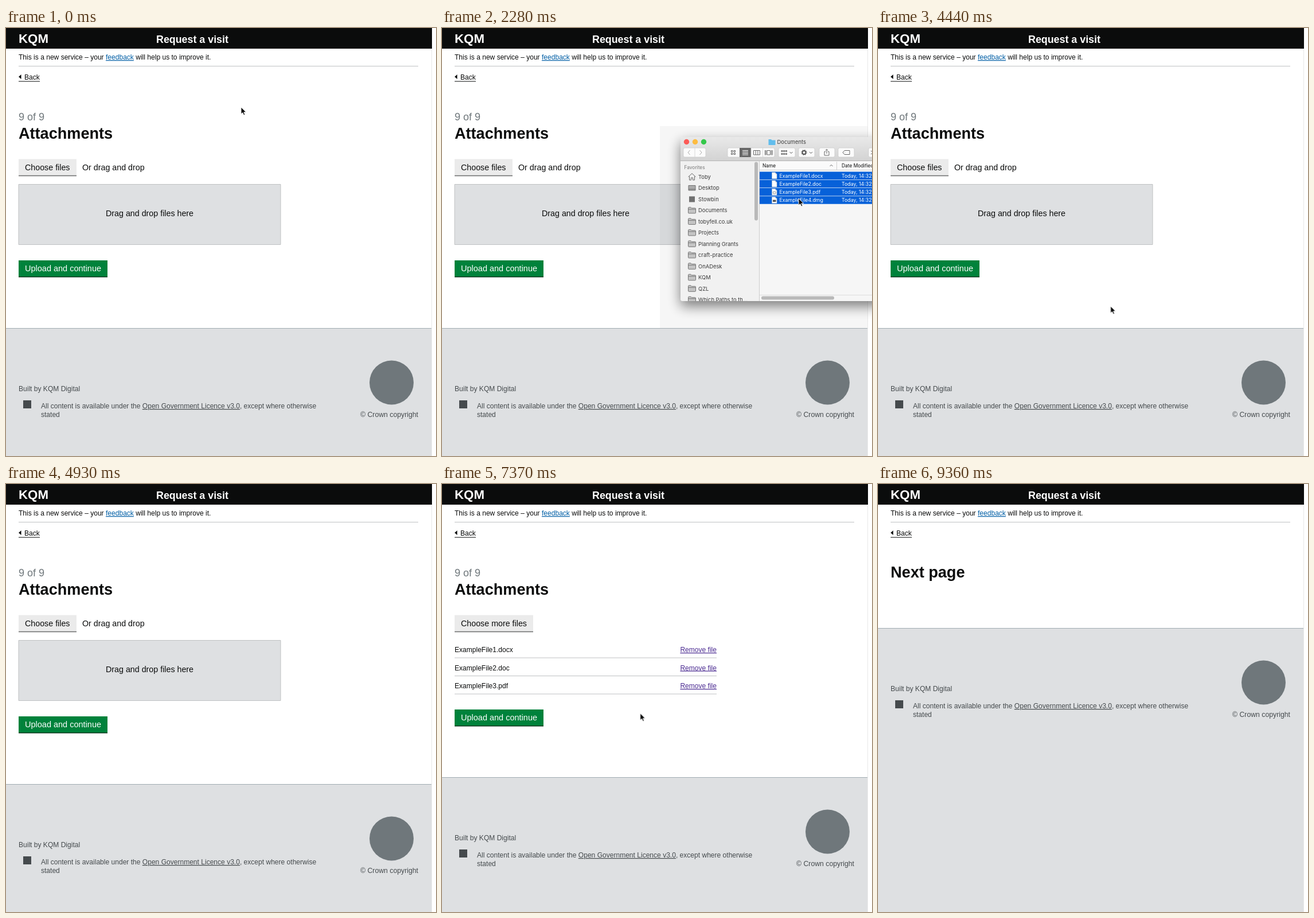
An HTML page that plays this animation: 750x746 px, repeating every 9840 ms.

```html
<!DOCTYPE html>
<html lang="en">
<head>
<meta charset="utf-8">
<title>Attachments</title>
<style>
html, body { margin: 0; width: 100%; height: 100%; overflow: hidden; background: #fff; }
svg { display: block; width: 750px; height: 746px; font: 12.05px "Liberation Sans", Arial, sans-serif; fill: #0b0c0c; }
.bold { font-weight: bold; }
.mid { font-size: 14.27px; }
.title { font-size: 27.1px; font-weight: bold; }
.grey { fill: #6f777b; }
.foot { fill: #454a4d; }
.under { text-decoration: underline; }
.link { fill: #005ea5; text-decoration: underline; }
.remove { fill: #4c2c92; text-decoration: underline; text-anchor: end; }
.rule { stroke: #bfc1c3; }
.ui { font: 9.4px Inter, Roboto, sans-serif; fill: #3a3a3a; }
.list { font: 8.8px Inter, Roboto, sans-serif; fill: #222; }
.small { font: 8.4px Inter, Roboto, sans-serif; }
.icon { fill: none; stroke: #666; stroke-width: 1; }
.window { filter: drop-shadow(0 9px 11px rgba(0, 0, 0, .5)); }

/* One 9840 ms loop: 1% is 98.4 ms */
.anim { animation: 9.84s step-end infinite; }
#form { animation-name: form; }
#heading { animation-name: heading; }
#files { animation-name: files; }
#lastFile { animation-name: lastFile; }
#linkFocus { animation-name: linkFocus; }
#next { animation-name: next; }
#footer { animation-name: footer; }
#submit { animation-name: submit; }
#submitFill { animation-name: hover; }
#submitFocus { animation-name: submitFocus; }
#finder { animation-name: finder; }
#selectFirst { animation-name: selectFirst; }
#selectRest { animation-name: selectRest; }
#actions { animation-name: actions; }
#stripes { animation-name: stripes; }
#ghost { animation-name: ghost; }
#arrow { animation-name: arrow; }
#hand { animation-name: hand; }
#pointer { animation-name: pointer; }

@keyframes form { 0% { opacity: 1 } 55.87%, 100% { opacity: 0 } }
@keyframes heading { 0% { opacity: 1 } 85.55%, 100% { opacity: 0 } }
@keyframes files { 0%, 85.55%, 100% { opacity: 0 } 55.87% { opacity: 1 } }
@keyframes lastFile { 0% { opacity: 1 } 60.65%, 100% { opacity: 0 } }
@keyframes linkFocus { 0% { opacity: 0 } 58.92%, 100% { opacity: 1 } }
@keyframes next { 0% { opacity: 0 } 85.55%, 100% { opacity: 1 } }
@keyframes footer {
  0% { transform: translateY(523px) }
  55.87% { transform: translateY(543px) }
  60.65% { transform: translateY(511px) }
  85.55%, 100% { transform: translateY(251px) }
}
@keyframes submit {
  0% { transform: translate(22px, 405px); opacity: 1 }
  55.87% { transform: translate(22px, 424px); opacity: 1 }
  60.65% { transform: translate(22px, 393px); opacity: 1 }
  85.55%, 100% { transform: translate(22px, 393px); opacity: 0 }
}
@keyframes hover { 0% { fill: #00823b } 77.22%, 100% { fill: #00692f } }
@keyframes submitFocus { 0% { opacity: 0 } 83.11%, 100% { opacity: 1 } }
@keyframes finder { 0%, 43.27%, 100% { opacity: 0 } 7.5% { opacity: 1 } }
@keyframes selectFirst { 0% { opacity: 0 } 17.866%, 100% { opacity: 1 } }
@keyframes selectRest { 0% { opacity: 0 } 23.15%, 100% { opacity: 1 } }
@keyframes actions { 0% { opacity: .4 } 17.866%, 100% { opacity: 1 } }
@keyframes stripes { 0% { opacity: 0 } 35.04%, 100% { opacity: 1 } }
@keyframes ghost { 0%, 42.05%, 100% { opacity: 0 } 35.04% { opacity: 1 } }
@keyframes arrow { 0%, 66.75%, 89.82%, 100% { opacity: 1 } 55.87%, 77.22% { opacity: 0 } }
@keyframes hand { 0%, 66.75%, 89.82%, 100% { opacity: 0 } 55.87%, 77.22% { opacity: 1 } }
@keyframes pointer {
  0% { transform: translate(410px, 138px) }
  .589% { transform: translate(412px, 140px) }
  2.114% { transform: translate(412px, 140px); animation-timing-function: steps(3, start) }
  3.791% { transform: translate(712px, 191px) }
  7.5% { transform: translate(682px, 227px) }
  11.768% { transform: translate(682px, 227px); animation-timing-function: steps(3, start) }
  13.598% { transform: translate(622px, 254px) }
  17.866% { transform: translate(622px, 254px); animation-timing-function: steps(6, start) }
  21.28% { transform: translate(622px, 297px) }
  23.76% { transform: translate(622px, 297px); animation-timing-function: steps(6, start) }
  27.175% { transform: translate(622px, 254px) }
  28.435% { transform: translate(622px, 254px); animation-timing-function: steps(3, start) }
  30.11% { transform: translate(626px, 250px) }
  35.04% { transform: translate(626px, 250px); animation-timing-function: steps(5, start) }
  38.72% { transform: translate(318px, 331px); animation-timing-function: steps(4, start) }
  41.36% { transform: translate(298px, 338px) }
  43.27% { transform: translate(298px, 338px); animation-timing-function: steps(3, start) }
  45.1% { transform: translate(380px, 447px); animation-timing-function: steps(8, start) }
  50.79% { transform: translate(585px, 750px) }
  55.87% { transform: translate(443px, 385px) }
  66.75% { transform: translate(443px, 385px); animation-timing-function: steps(4, start) }
  69.46% { transform: translate(440px, 395px) }
  73.66% { transform: translate(440px, 395px); animation-timing-function: steps(9, start) }
  78.91% { transform: translate(157px, 409px) }
  89.82% { transform: translate(157px, 409px); animation-timing-function: steps(9, start) }
  95.77%, 100% { transform: translate(709px, 750px) }
}
</style>
</head>
<body>
<svg viewBox="0 0 750 746">
  <defs>
    <clipPath id="frame"><path d="M416 195q0-5 5-5H800V476H420q-4 0-4-4z"/></clipPath>
    <linearGradient id="bar" x2="0" y2="1"><stop stop-color="#e9e9e9"/><stop offset="1" stop-color="#d3d3d3"/></linearGradient>
    <path id="folder" d="M0 2.5Q0 1 1 1H4.5L6 2.5H12Q13 2.5 13 3.5V10.5Q13 11.5 12 11.5H1Q0 11.5 0 10.5zM0 4.5H13" fill="#c4c4c4" stroke="#757575"/>
    <g id="doc"><path d="M0 0H5.5L8.5 3V11H0z" fill="#fff" stroke="#bbb" stroke-width=".5"/><path d="M5.5 0V3H8.5z" fill="#d8d8d8"/></g>
  </defs>

  <path d="M742.5 0V746" stroke="#e8e8e8"/>
  <path d="M0 0H743V36H0z"/>
  <g class="bold" fill="#fff">
    <text x="22" y="25.5" font-size="22.3">KQM</text>
    <text x="262" y="25.5" font-size="17.85">Request a visit</text>
  </g>
  <text x="22" y="55">This is a new service – your <tspan class="link">feedback</tspan> will help us to improve it.</text>
  <path class="rule" d="M22 66.5H719"/>
  <path d="M22 85L26.5 81V89zM22 92.5H59V93.5H22z"/>
  <text x="32" y="90">Back</text>

  <g id="heading" class="anim">
    <text class="grey" x="22" y="161" font-size="18">9 of 9</text>
    <text class="title" x="22" y="193">Attachments</text>
  </g>

  <g id="form" class="anim mid">
    <path d="M22 228.5H123V257H22z" fill="#ebebeb"/>
    <path d="M22 257.5H123" stroke="#6b6d6d" stroke-width="1.5"/>
    <text x="33" y="248">Choose files</text>
    <text x="133" y="248">Or drag and drop</text>
    <path class="rule" d="M22 272.5H479V377.5H22z" fill="#dee0e2"/>
    <text x="174" y="328">Drag and drop files here</text>
  </g>

  <g id="files" class="anim">
    <path d="M22 228.5H159V257H22z" fill="#ebebeb"/>
    <path d="M22 257.5H159" stroke="#6b6d6d" stroke-width="1.5"/>
    <text class="mid" x="33" y="248">Choose more files</text>
    <g id="fileRows"></g>
    <g id="lastFile" class="anim">
      <g id="lastRow"></g>
      <path id="linkFocus" class="anim" d="M414 375H480V391H414z" fill="none" stroke="#ffbf47" stroke-width="2"/>
    </g>
  </g>

  <g id="next" class="anim"><text class="title" x="22" y="163">Next page</text></g>

  <g id="submit" class="anim">
    <path id="submitFill" class="anim" d="M0 0H155V29H0z"/>
    <path d="M0 28H155V29.5H0z" fill="#003618"/>
    <path id="submitFocus" class="anim" d="M-1-1H156V29.500H-1z" fill="none" stroke="#ffbf47" stroke-width="2"/>
    <text x="11" y="19" font-size="14.5" fill="#fff">Upload and continue</text>
  </g>

  <g id="footer" class="anim">
    <path d="M0 0H742V520H0z" fill="#dee0e2"/>
    <path d="M0 .5H742" stroke="#a1acb2"/>
    <g class="foot">
      <text x="22" y="110">Built by KQM Digital</text>
      <rect x="30" y="126" width="14" height="14"/>
      <text x="61" y="140">All content is available under the <tspan class="under">Open Government Licence v3.0</tspan>, except where otherwise</text>
      <text x="61" y="155">stated</text>
      <text x="719" y="155" text-anchor="end" font-size="12.25">© Crown copyright</text>
    </g>
    <circle class="grey" cx="672.5" cy="95" r="38.5"/>
  </g>

  <g id="finder" class="anim">
    <path d="M380 171H742V523H380z" fill-opacity=".035"/>
    <path class="window" d="M416 195q0-5 5-5H800V476H420q-4 0-4-4z" fill="#f6f6f6"/>
    <g clip-path="url(#frame)">
      <path d="M416 190H800V231H416z" fill="url(#bar)"/>
      <path d="M416 231.5H800" stroke="#b5b5b5"/>
      <circle cx="426.5" cy="198.5" r="4.7" fill="#fc5b57"/>
      <circle cx="441.5" cy="198.5" r="4.7" fill="#fdbc40"/>
      <circle cx="456.5" cy="198.5" r="4.7" fill="#34c84a"/>
      <path d="M569.5 194H574L575.5 195.5H581.5V204H569.5z" fill="#62bdec"/>
      <text class="ui" x="584.5" y="202">Documents</text>
      <g id="tools" fill="#fbfbfb" stroke="#c3c3c3" stroke-width=".6"></g>
      <path d="M519 209H539V225H519z" fill="#666"/>
      <path d="M539 209V225M559.5 209V225M441 209V225" stroke="#ccc" stroke-width=".7"/>
      <g class="icon">
        <path d="M432.5 213L429 217L432.5 221M449.5 213L453 217L449.5 221" stroke="#aaa"/>
        <path d="M504.5 213.5h2.5v2.5h-2.5zm4.5 0h2.5v2.5H509zm-4.5 4.5h2.5v2.5h-2.5zm4.5 0h2.5v2.5H509z"/>
        <path d="M524 213.5H534M524 216H534M524 218.5H534M524 221H534" stroke="#fff"/>
        <path d="M543.5 213.5H554.5V221H543.5zM547.2 213.5V221M550.9 213.5V221M567 213.5H572.5V221H567zM563.5 213V221.5M565.2 213V221.5M574.5 213V221.5M576.3 213V221.5"/>
        <path d="M592 213.5h2v2h-2zm3.7 0h2v2h-2zm3.7 0h2v2h-2zM592 218.5h2v2h-2zm3.7 0h2v2h-2zm3.7 0h2v2h-2zM606.5 216L609 218.5L611.5 216M641 216L643.5 218.5L646 216" stroke="#555"/>
        <circle cx="631.5" cy="217" r="3" stroke="#555" stroke-width="2"/>
        <circle cx="631.5" cy="217" r="4.6" stroke="#555" stroke-dasharray="1.8 1.81"/>
        <g id="actions" class="anim">
          <path d="M669 215.5H667V222H675V215.5H673M671 219V211.5M668.8 213.5L671 211.3L673.2 213.5"/>
          <path d="M699 217L702 213.5H711V220.5H702zM702.5 217h.6"/>
        </g>
        <path d="M748 214L752 217L748 220"/>
      </g>

      <path d="M416 232H553V476H416z" fill="#f1f1f1"/>
      <text class="small" x="422.5" y="246" fill="#777" font-weight="500">Favorites</text>
      <g id="sidebar" class="ui"></g>
      <rect x="545" y="233.5" width="6" height="102" rx="3" fill="#b9b9b9"/>
      <path d="M553.5 232V476" stroke="#ccc"/>

      <path d="M554 232H800V247H554z" fill="#fafafa"/>
      <path d="M554 247.5H800M688.5 233V247" stroke="#d0d0d0" fill="none"/>
      <path class="icon" d="M676.5 241L679 238.5L681.5 241"/>
      <text class="small" x="559" y="243" font-weight="500">Name</text>
      <text class="small" x="697" y="243">Date Modified</text>
      <g id="stripes" class="anim"></g>
      <g id="plainRows"></g>
      <g id="selectFirst" class="anim"></g>
      <g id="selectRest" class="anim"></g>
      <path d="M554 465.5H800" stroke="#ddd"/>
      <rect x="557" y="467.5" width="127" height="6" rx="3" fill="#b9b9b9"/>
    </g>
  </g>

  <g id="pointer" class="anim">
    <g id="ghost" class="anim"></g>
    <path id="arrow" class="anim" d="M0 0V12L2.8 9.6L4.9 14L6.9 13.1L4.9 8.8H8.8z" stroke="#fff" stroke-width=".9"/>
    <path id="hand" class="anim" d="M-2.8 1.2Q-2-.2-.8 1.2L0 4.800Q1.300 4 2 5.200Q3.300 4.500 4 5.700Q5.500 5.300 5.700 7L5 10V12.500H-.5L-4-.5+0" fill="#fff" stroke="#111" stroke-width=".9"/>
  </g>
</svg>
<script>
const fill = (id, html) => document.getElementById(id).innerHTML = html;
const names = ["ExampleFile1.docx", "ExampleFile2.doc", "ExampleFile3.pdf", "ExampleFile4.dmg"];

document.getElementById("hand").setAttribute("d",
  "M-.8 1.2Q0-.2 1.2 1.2L2 4.8Q3.3 4 4 5.2Q5.300 4.500 6 5.700Q7.500 5.300 7.700 7L7 10V12.500H1L-3.500 7.500Q-3.300 5.900-1.700 6.800L-.2 8zM2.500 7.500V10M4.200 7.500V10M5.800 7.500V10");

// Uploaded files on the page
const uploaded = names.map((name, i) => {
  const y = 293 + 31.5 * i;
  return `<text x="22" y="${y}">${name}</text><text class="remove" x="479" y="${y}">Remove file</text>
    <path class="rule" d="M22 ${y + 10}H479"/>`;
});
fill("fileRows", uploaded.slice(0, 3).join(""));
fill("lastRow", uploaded[3]);

// File window: toolbar buttons as [x, width]
fill("tools", [[421, 39], [498, 82], [587, 29], [622, 28], [658, 27], [691, 28], [744, 30]]
  .map(([x, w]) => `<rect x="${x}" y="209" width="${w}" height="16" rx="2.5"/>`).join(""));

const places = ["Toby", "Desktop", "Stowbin", "Documents", "tobyfell.co.uk", "Projects", "Planning Grants",
  "craft-practice", "OnADesk", "KQM", "QZL", "Which Paths to th…"];
const placeIcons = [
  `<path class="icon" stroke-width="1.3" d="M0 6.5L6.5 .5L13 6.5M2 5.5V12H5V8H8V12H11V5.5"/>`,
  `<path d="M.5 2H12.5V10.5H.5z" fill="#aaa" stroke="#707070"/><path d="M.5 8.5H12.5" stroke="#707070"/>`,
  `<path d="M1.5 1.5H11.5V11.5H1.5z" fill="#707070"/>`
];
fill("sidebar", places.map((name, i) => {
  const y = 259.3 + 19.48 * i;
  return `<g transform="translate(429.5 ${y - 6.3})">${placeIcons[i] || '<use href="#folder"/>'}</g>
    <text x="447" y="${y + 3.5}">${name}</text>`;
}).join(""));

// Small marks set the last two document icons apart
const docIcon = (x, y, i) => `<g transform="translate(${x} ${y})"><use href="#doc"/>` +
  (i === 2 ? `<path d="M2 5H6.5V8.5H2z" fill="none" stroke="#999"/>` : "") +
  (i === 3 ? `<path d="M1.5 5H7V8.5H1.5z" fill="#555"/>` : "") + `</g>`;

const row = (name, i, selected) => {
  const y = 257.3 + 14.25 * i;
  const back = selected ? `<path d="M554 ${y - 6.7}H800v13.3H554z" fill="#0761d9"/>` : "";
  return back + docIcon(575.5, y - 5.5, i) +
    `<g class="list"${selected ? ' style="fill:#fff"' : ""}><text x="588.5" y="${y + 3.2}">${name}</text>
    <text x="697" y="${y + 3.2}">Today, 14:32</text></g>`;
};
const selected = names.map((name, i) => row(name, i, true));
fill("plainRows", names.map((name, i) => row(name, i, false)).join(""));
fill("selectFirst", selected[0]);
fill("selectRest", selected.slice(1).join(""));
fill("stripes", Array.from({ length: 6 }, (_, i) =>
  `<path d="M554 ${307 + 28.5 * i}H617v14.25H554z" fill="#fff"/>`).join(""));

// Dragged files with count badge
const pillWidths = [85, 81, 81, 85];
fill("ghost", names.map((name, i) => {
  const y = 7 + 14.25 * i;
  return docIcon(-50, y - 5.5, i) +
    `<rect x="-39" y="${y - 6}" width="${pillWidths[i]}" height="12" rx="6" fill="#2273dc"/>
    <text class="list" style="fill:#fff" x="-37" y="${y + 3.2}">${name}</text>`;
}).join("") +
  `<circle cx="7" cy="17" r="6.8" fill="#23a52c"/><path d="M3.5 17H10.5M7 13.5V20.5" stroke="#fff" stroke-width="1.6"/>
  <circle cx="23.5" cy="17" r="6.8" fill="#f5333a"/>
  <text class="ui" style="fill:#fff" x="23.5" y="20.5" text-anchor="middle">4</text>`);
</script>
</body>
</html>
```
